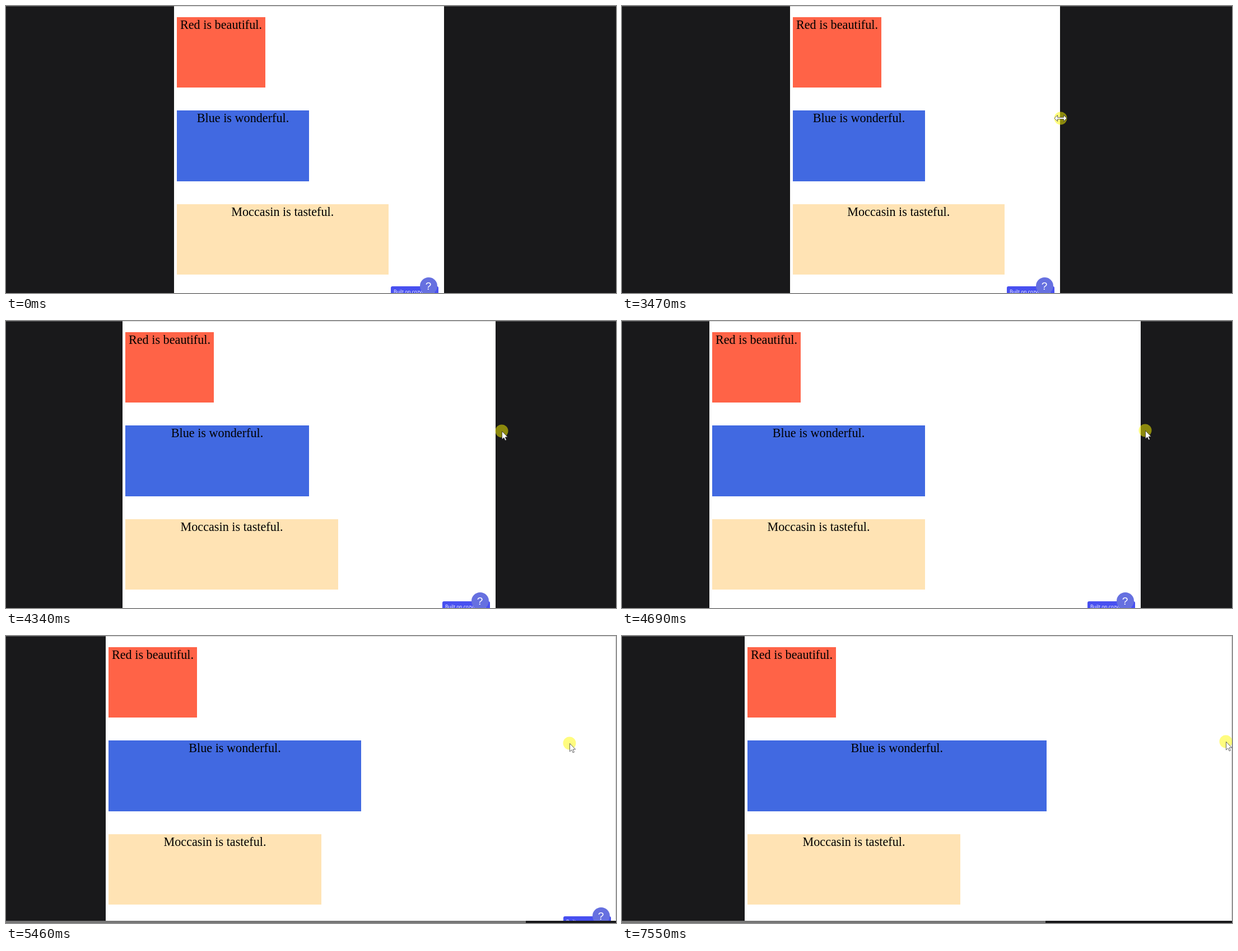
An HTML page that plays this animation: 1089 by 514 pixels, repeating every 8 s.

```html
<!DOCTYPE html>
<html lang="en">
<head>
<meta charset="utf-8">
<title>Responsive boxes</title>
<style>
  html, body { margin: 0; width: 100%; height: 100%; overflow: hidden; background: #19191b; }
  #stage { position: absolute; left: 0; top: 0; width: 1089px; height: 514px; overflow: hidden; background: #19191b; }
  #stage > *, #page > * { position: absolute; }
  #topline { left: 0; top: 0; width: 100%; height: 1px; background: rgba(150, 150, 150, .45); }
  #page { top: 0; height: 514px; background: #fff; }
  .box {
    left: 5px; height: 126.5px; text-align: center; white-space: nowrap; color: #000;
    font: 22.2px/28px "Liberation Serif", serif;
  }
  #red { top: 19.5px; width: 158px; background: #ff6347; }
  #blue { top: 187.2px; width: calc(50% - 5px); background: #4169e1; }
  #moccasin { top: 354.5px; width: calc(80% - 8px); max-width: 380px; background: #ffe3b4; }
  #badge {
    right: 10px; top: 502px; width: 80px; height: 22px; padding-left: 5px; border-radius: 3px;
    background: #4850f0; color: #fff; white-space: nowrap;
    font: 8.5px/20px "Open Sans", sans-serif;
  }
  #help {
    right: 12.5px; top: 486px; width: 31px; height: 31px; border-radius: 50%;
    background: #6670e0; color: #fff; text-align: center;
    font: 19px/32px "Liberation Sans", sans-serif;
  }
  #track { left: 0; top: 509.5px; width: 100%; height: 5px; background: #19191b; }
  #thumb { height: 100%; background: #767676; }
  #edge { right: 0; top: 0; width: 1px; height: 509px; background: #ccc; }
  #pointer { left: 0; top: 0; overflow: visible; }
  #pointer path { fill: #fff; stroke: #222; stroke-width: .7; }
</style>
</head>
<body>
<div id="stage">
  <div id="page">
    <div class="box" id="red">Red is beautiful.</div>
    <div class="box" id="blue">Blue is wonderful.</div>
    <div class="box" id="moccasin">Moccasin is tasteful.</div>
    <div id="badge">Built on cozydesks</div>
    <div id="help">?</div>
  </div>
  <div id="topline"></div>
  <div id="edge"></div>
  <div id="track"><div id="thumb"></div></div>
  <svg id="pointer" width="1" height="1">
    <circle id="press" r="11.5" fill="#fffa00" fill-opacity=".5"/>
    <path id="arrow" d="M.5 .5V15L3.8 11.9L6.2 17L8.4 16L6.1 11H10.6Z"/>
    <path id="resize" d="M-11 0L-5.5 -5.5V-1.5H5.5V-5.5L11 0L5.5 5.5V1.5H-5.5V5.5Z"/>
  </svg>
</div>
<script>
  const LOOP = 8000, STAGE = 1089;
  const STEP = 68, EARLY = 20;
  const APPEAR = 180, PRESS = 2730;

  const start = { x: 658, y: 433, width: 482 };
  const moves = [
    // The pointer wanders in and finds the panel's edge.
    { from: APPEAR, to: 650, x: 775, y: 163 },
    { from: 650, to: 920, x: 815, y: 220 },
    { from: 990, to: 1800, x: 779, y: 198 },
    { from: 2130, to: 2460, x: 783, y: 201 },
    // It drags the panel wider: speeding up, slowing down, then once more.
    { from: 3470, to: 4340, x: 885, y: 197, width: 666, power: 2.4 },
    { from: 4340, to: 5030, x: 972, y: 196, width: 849, power: .8 },
    { from: 5030, to: 5590, x: 1016, y: 191, width: 930, power: .8 },
    { from: 6780, to: 7550, x: 1078, y: 189, width: 1077 }
  ];

  const $ = id => document.getElementById(id);
  const show = (id, on) => { $(id).style.display = on ? "" : "none"; };

  function progress({ from, to, power = 1 }, t) {
    const steps = Math.floor((t - from + EARLY) / STEP);
    const elapsed = Math.min(steps * STEP, t - from, to - from);
    return (t >= to ? 1 : elapsed / (to - from)) ** power;
  }

  function poseAt(t) {
    const pose = { ...start };
    for (const move of moves) {
      if (t < move.from) break;
      const u = progress(move, t);
      for (const key in pose) pose[key] += ((move[key] ?? pose[key]) - pose[key]) * u;
    }
    for (const key in pose) pose[key] = Math.round(pose[key]);
    return pose;
  }

  function draw(t) {
    const { x, y, width } = poseAt(t);

    // Centred while it fits, then drifting right as its scroll area grows.
    const left = Math.round(Math.max(541 - width / 2, 162 + (width - 849) / 4));
    const right = left + width;
    $("page").style.left = left + "px";
    $("page").style.width = width + "px";

    const scrollWidth = 1167 + 1.76 * (width - 849);
    show("track", width > 790);
    show("edge", right > STAGE);
    $("thumb").style.width = STAGE * STAGE / scrollWidth + "px";

    const onEdge = Math.abs(x - right) <= 2;
    show("pointer", t >= APPEAR);
    show("press", t >= PRESS);
    show("resize", onEdge);
    show("arrow", !onEdge);
    $("pointer").style.transform = `translate(${x}px, ${y}px)`;
  }

  function tick() {
    draw(performance.now() % LOOP);
    requestAnimationFrame(tick);
  }
  tick();
</script>
</body>
</html>
```
